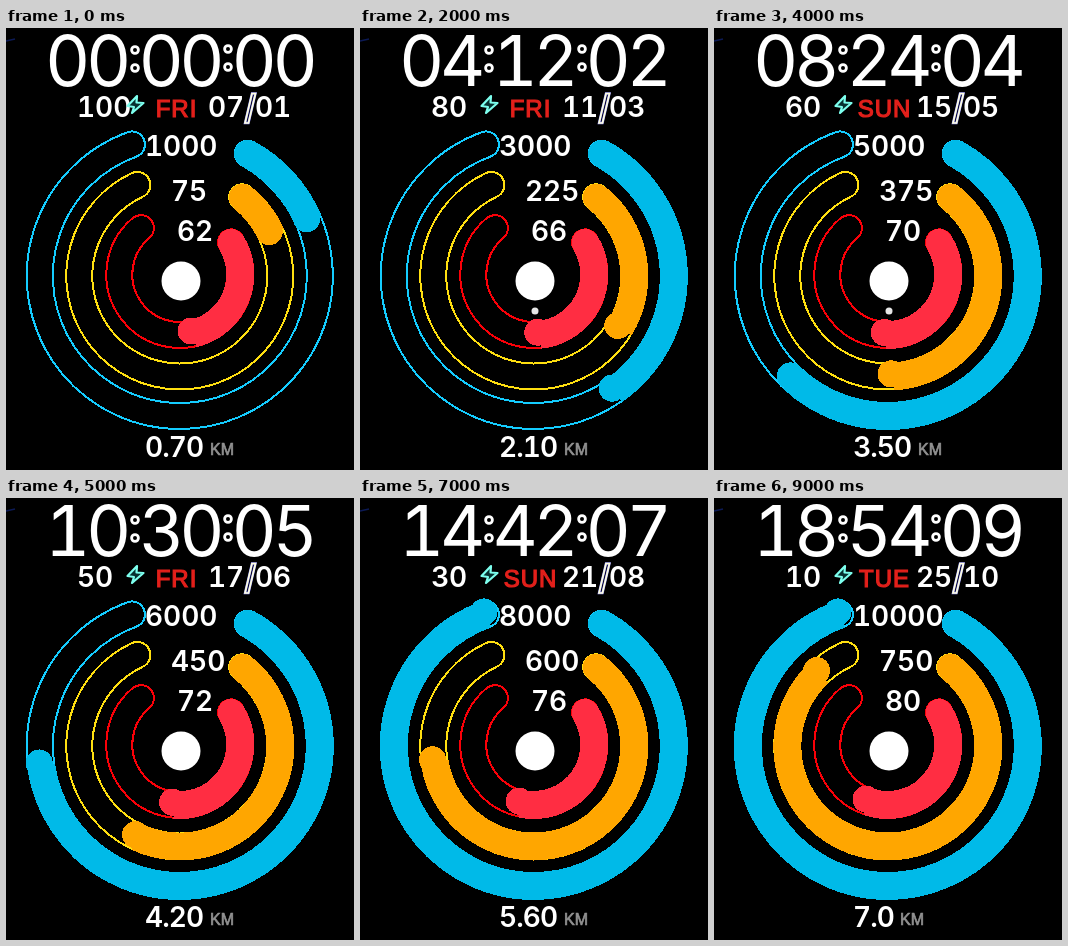
Recreate the animation shown at these times as an HTML page. Size 348 px wide and 442 px high, loop 10 s.

```html
<!DOCTYPE html>
<html lang="en">
<head>
<meta charset="utf-8">
<title>Watch face</title>
<style>
  html, body { margin: 0; width: 100%; height: 100%; overflow: hidden; background: #000; }
  svg { display: block; width: 100%; height: 100%; }
  text { font-family: Inter, Arial, sans-serif; font-variant-numeric: tabular-nums; fill: #fff; }
  .clock { font-size: 70px; letter-spacing: -4.5px; text-anchor: middle; }
  .value { font-size: 28px; font-weight: 600; }
  #distance { letter-spacing: -.9px; }
  #weekday, #unit { font-family: "Liberation Sans", Arial, sans-serif; }
  #weekday { font-size: 24px; letter-spacing: 1px; text-anchor: middle; fill: #e3201b; stroke: #e3201b; stroke-width: 1.2px; }
  #unit { font-size: 16px; fill: #929292; stroke: #929292; stroke-width: .7px; }
  .colon circle { fill: #000; stroke: #fff; stroke-width: 2.8px; }
  #rings path { fill: none; shape-rendering: crispEdges; }
  .round { stroke-linecap: round; }
</style>
</head>
<body>
<svg viewBox="0 0 348 442">
  <rect width="348" height="442"/>
  <path d="M0 13L9 11" stroke="#0c1a55" stroke-width="1.5"/>

  <text class="clock" id="hours" x="80" y="57.5"></text>
  <text class="clock" id="minutes" x="173.3" y="57.5"></text>
  <text class="clock" id="seconds" x="266.5" y="57.5"></text>
  <g class="colon">
    <circle cx="129" cy="22" r="3.4"/><circle cx="129" cy="40" r="3.4"/>
    <circle cx="222" cy="21" r="3.4"/><circle cx="222" cy="39" r="3.4"/>
  </g>

  <text class="value" id="battery" x="71" y="89"></text>
  <path d="M131 68L121.500 78L128 79L126 85L137.500 75L130.500 74.500Z" fill="#06302f" stroke="#7dffee" stroke-width="2.200" stroke-linejoin="round"/>
  <text id="weekday" x="170.5" y="88.5"></text>
  <text class="value" id="day" x="202" y="89"></text>
  <path d="M246 65.500H249.500L242.500 95H239Z" fill="#06061c" stroke="#9494ff" stroke-width="2.400"/>
  <path d="M246 65.500H249.500L242.500 95H239Z" fill="none" stroke="#ffffe0" stroke-width="1.700"/>
  <text class="value" id="month" x="249" y="89"></text>

  <g id="rings"></g>

  <text class="value" id="steps" x="139" y="128"></text>
  <text class="value" id="calories" x="165" y="173"></text>
  <text class="value" id="pulse" x="171" y="213"></text>
  <circle cx="175" cy="253" r="19.5" fill="#fff"/>
  <circle id="dot" cx="175" cy="283" r="3.5" fill="#e6e6e6"/>
  <text class="value" id="distance" x="139" y="429"></text>
  <text id="unit" y="427"></text>
</svg>
<script>
const $ = id => document.getElementById(id);
const pad = n => String(n).padStart(2, '0');

// Angles are degrees clockwise from twelve o'clock.
const rings = [
  { y: 248, r: 140, from: 29, to: 340, line: '#14ccff', fill: '#00bae8', end: i => 28 + 39 * (i + 1) },
  { y: 248, r: 100.5, from: 38.4, to: 335, line: '#ffdf10', fill: '#ffa600', end: i => 37.5 + 27.9 * (i + 1) },
  { y: 246.5, r: 60.5, from: 58, to: 320, line: '#fa0008', fill: '#ff2d42', end: i => 57.5 + 1.77 * (62 + 2 * i) }
];

function point({ y, r }, deg) {
  const a = deg * Math.PI / 180;
  return [173.8 + r * Math.sin(a), y - r * Math.cos(a)];
}

function arc(ring, to) {
  const large = to - ring.from > 180 ? 1 : 0;
  return `M${point(ring, ring.from)}A${ring.r} ${ring.r} 0 ${large} 1 ${point(ring, to)}`;
}

// The moving cap sits slightly up and left of the bar's end.
function caps(ring, to) {
  const [x, y] = point(ring, to);
  return `M${point(ring, ring.from)}h.01M${x - 2} ${y - 2.5}h.01`;
}

function addPath(stroke, width, d, className = '') {
  const path = document.createElementNS('http://www.w3.org/2000/svg', 'path');
  path.setAttribute('stroke', stroke);
  path.setAttribute('stroke-width', width);
  path.setAttribute('class', className);
  path.setAttribute('d', d);
  $('rings').append(path);
  return path;
}

for (const ring of rings) {
  const track = arc(ring, ring.to);
  addPath(ring.line, 28, track, 'round');
  addPath('#000', 24, track, 'round');
  ring.bar = addPath(ring.fill, 28, '');
  ring.caps = addPath(ring.fill, 27, '', 'round');
}

function show(i) {
  const n = i + 1;
  const date = new Date(2022, i, 7 + 2 * i);
  const texts = {
    hours: pad(2 * i),
    minutes: pad(6 * i),
    seconds: pad(i),
    battery: 100 - 10 * i,
    weekday: ['SUN', 'MON', 'TUE', 'WED', 'THU', 'FRI', 'SAT'][date.getDay()],
    day: pad(date.getDate()),
    month: pad(n),
    steps: 1000 * n,
    calories: 75 * n,
    pulse: 62 + 2 * i,
    distance: n < 10 ? (0.7 * n).toFixed(2) : '7.0',
    unit: 'KM'
  };
  for (const id in texts) $(id).textContent = texts[id];
  $('unit').setAttribute('x', n < 10 ? 204 : 186);
  $('dot').style.display = i > 0 && i < 5 ? '' : 'none';
  for (const ring of rings) {
    const end = Math.min(ring.end(i), ring.to);
    ring.bar.setAttribute('d', arc(ring, end));
    ring.caps.setAttribute('d', caps(ring, end));
  }
}

let shown = -1;
const start = performance.now();
function tick() {
  const i = Math.floor((performance.now() - start) / 1000) % 10;
  if (i !== shown) show(shown = i);
  requestAnimationFrame(tick);
}
tick();
</script>
</body>
</html>
```
